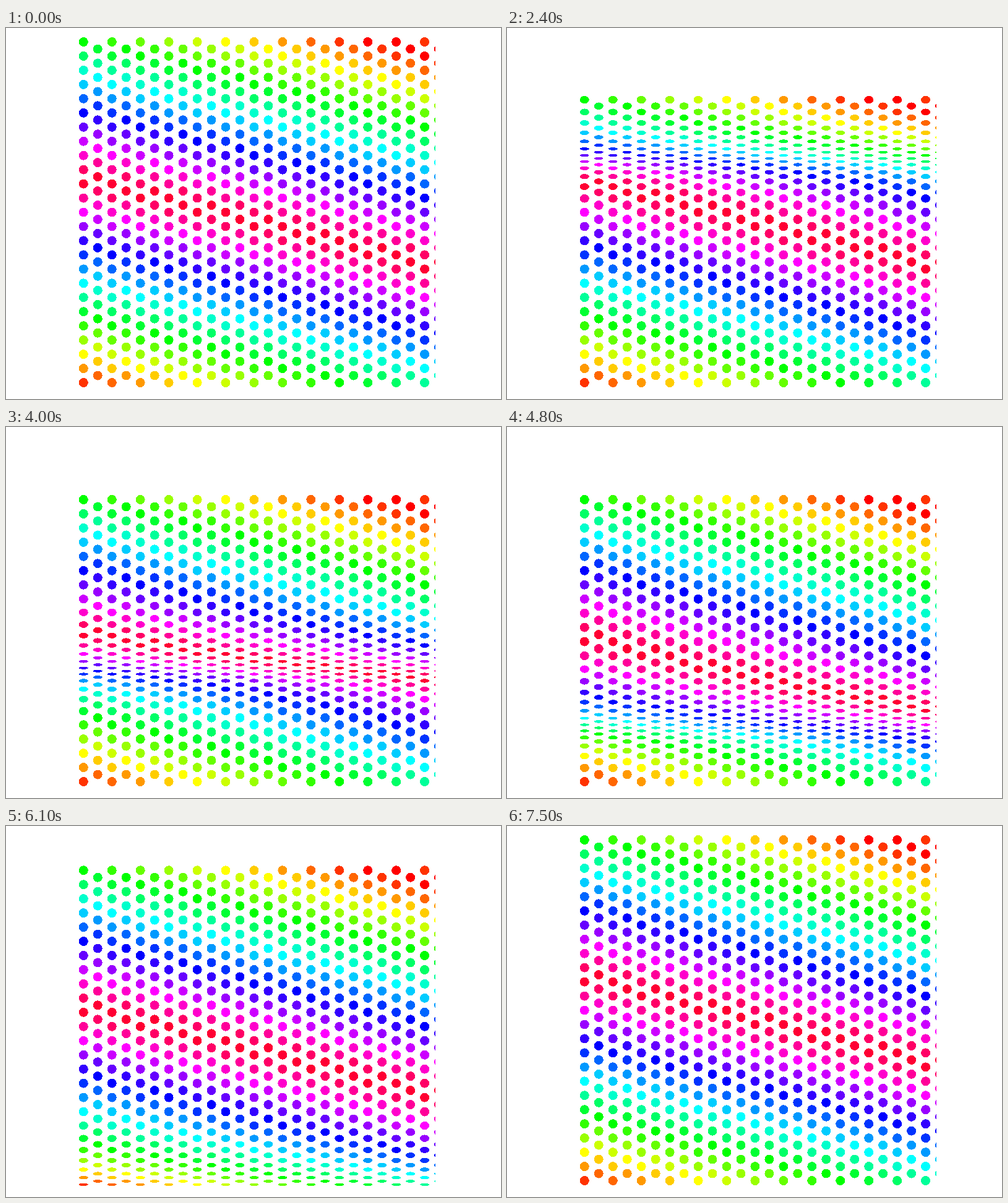
Animation, 800 px wide and 600 px high, one loop 7600 ms. Source, as an HTML page:

```html
<!DOCTYPE html>
<html lang="en">
<head>
<meta charset="utf-8">
<title>Rolling squeeze</title>
<style>
  html, body { margin: 0; width: 100%; height: 100%; overflow: hidden; background: #fff; }
  svg { display: block; }
</style>
</head>
<body>
<svg width="800" height="600" viewBox="0 0 800 600" shape-rendering="crispEdges">
  <clipPath id="panel"><rect width="694" height="600"/></clipPath>
  <g id="dots" clip-path="url(#panel)"></g>
</svg>
<script>
const LOOP = 7600, STEP = 100;
const ROWS = 49, COLS = 26;
const LEFT = 125.3, COL_GAP = 22.97;
const TOP = 22.5, ROW_GAP = 11.48;
const RADIUS = 7.5;
const FLOOR = TOP + ROWS * ROW_GAP;

// Row spacing factor against the steps since the squeeze reached the row.
const SQUEEZE = [[0, 1], [5, .676], [9, .443], [10.5, .425], [13, .468], [16, .584], [21, .798], [26, 1]];

function spacing(age) {
  if (age <= 0 || age >= 26) return 1;
  const i = SQUEEZE.findIndex(([a]) => a > age);
  const [a0, s0] = SQUEEZE[i - 1], [a1, s1] = SQUEEZE[i];
  return s0 + (s1 - s0) * (age - a0) / (a1 - a0);
}

// The rainbow runs up 30 hues and back down again.
function color(row, col) {
  const v = (70 + row - Math.floor(col / 2)) % 60;
  return `hsl(${12 * (v < 30 ? v : 59 - v)}, 100%, 50%)`;
}

const layer = document.getElementById('dots');
const rows = Array.from({ length: ROWS }, (_, row) => {
  const dots = [];
  for (let col = row % 2; col < COLS; col += 2) {
    const dot = document.createElementNS(layer.namespaceURI, 'ellipse');
    dot.setAttribute('cx', (LEFT + col * COL_GAP).toFixed(2));
    dot.setAttribute('rx', RADIUS);
    dot.setAttribute('fill', color(row, col));
    layer.append(dot);
    dots.push(dot);
  }
  return dots;
});

// Rows stack upwards from the fixed floor.
function draw(step) {
  let y = FLOOR;
  for (let row = ROWS - 1; row >= 0; row--) {
    const s = spacing(step - row);
    y -= s * ROW_GAP;
    for (const dot of rows[row]) {
      dot.setAttribute('cy', y.toFixed(2));
      dot.setAttribute('ry', (RADIUS * s ** 1.5).toFixed(2));
    }
  }
}

let shown = -1;
function tick() {
  const step = Math.max(0, Math.floor(performance.now() % LOOP / STEP) - 1);
  if (step !== shown) draw(shown = step);
  requestAnimationFrame(tick);
}
tick();
</script>
</body>
</html>
```
